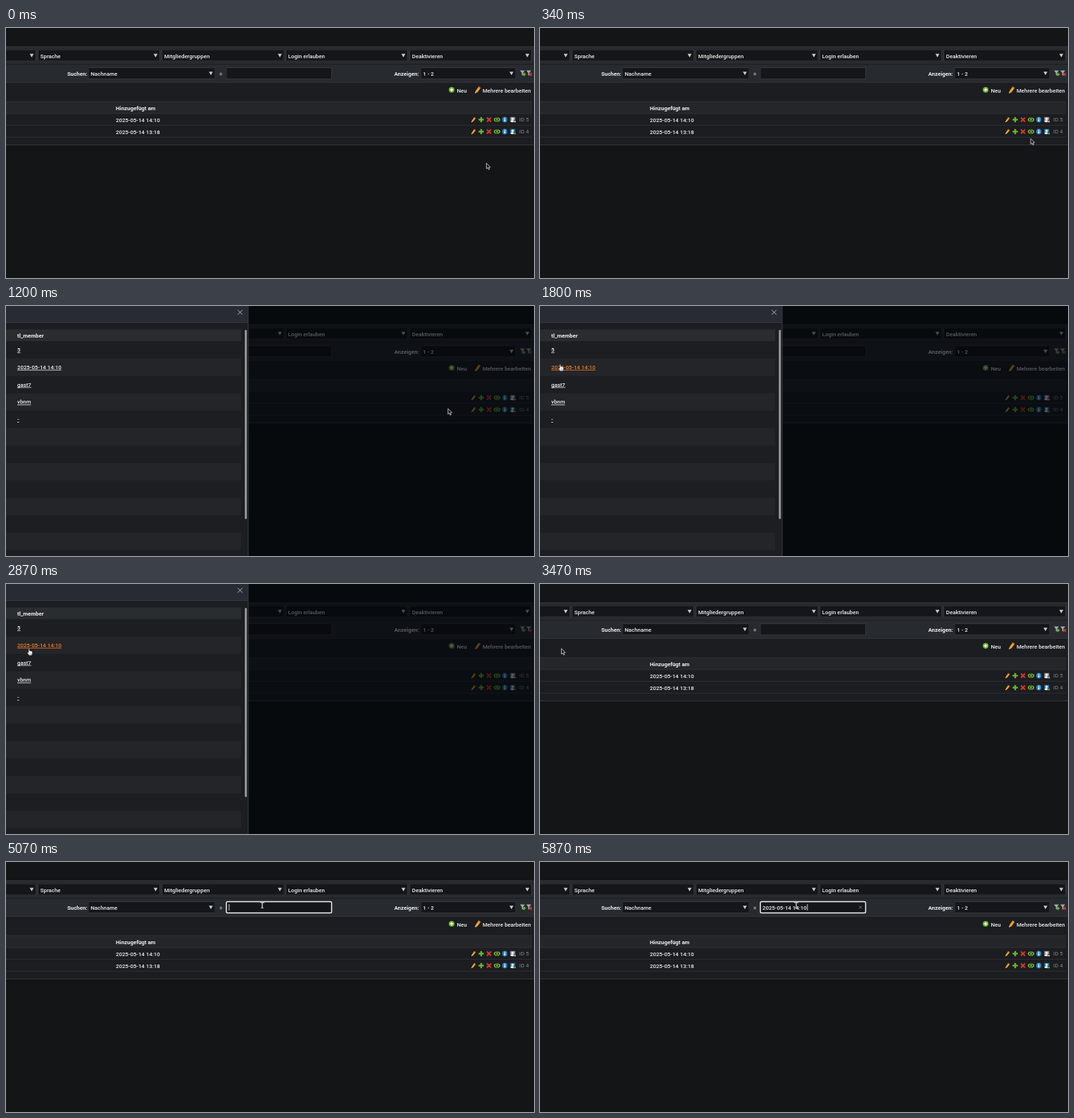
An HTML page with a canvas that plays this animation: 750 px wide and 356 px high, repeating every 5940 ms.

```html
<!DOCTYPE html>
<html lang="de">
<head>
<meta charset="utf-8">
<title>Mitglieder</title>
<style>
html, body { margin: 0; width: 100%; height: 100%; overflow: hidden; background: #141517; }
canvas { display: block; width: 750px; height: 356px; }
</style>
</head>
<body>
<canvas id="stage"></canvas>
<script>
const W = 750, H = 356, LOOP = 5940, STEP = 1000 / 15;
const canvas = document.getElementById('stage');
const ctx = canvas.getContext('2d');
const dpr = window.devicePixelRatio || 1;
canvas.width = W * dpr;
canvas.height = H * dpr;

const FONT = 'Roboto, "Open Sans", sans-serif';
const DATE = '2025-05-14 14:10';
const TEXT = '#f0f0f0', GREEN = '#6cb52d', RED = '#d8352b', AMBER = '#f0a32c', BLUE = '#2583bd';

const TICK = { open: 13, load: 17, close: 52, focus: 75, paste: 83 };

// Pointer path: tick, x, y
const PATH = [
  [0, 682, 192], [9, 707, 132], [16, 707, 132], [21, 481, 171],
  [26, 27, 76], [27, 26, 82.5], [30, 26, 83.5], [38, 38, 102],
  [39, 38, 102], [43, 30, 91.5], [58, 30, 91.5], [67, 290, 73], [71, 364, 61]
];

function rect(x, y, w, h, color) {
  ctx.fillStyle = color;
  ctx.fillRect(x, y, w, h);
}

function frame(x, y, w, h, color, line = 1) {
  ctx.strokeStyle = color;
  ctx.lineWidth = line;
  ctx.strokeRect(x + line / 2, y + line / 2, w - line, h - line);
}

function poly(points, color, stroke, line = 0.8) {
  ctx.beginPath();
  points.forEach(([x, y]) => ctx.lineTo(x, y));
  ctx.closePath();
  if (color) { ctx.fillStyle = color; ctx.fill(); }
  if (stroke) { ctx.strokeStyle = stroke; ctx.lineWidth = line; ctx.stroke(); }
}

function line(x1, y1, x2, y2, color, width) {
  ctx.beginPath();
  ctx.moveTo(x1, y1);
  ctx.lineTo(x2, y2);
  ctx.strokeStyle = color;
  ctx.lineWidth = width;
  ctx.stroke();
}

function oval(x, y, rx, ry, color) {
  ctx.beginPath();
  ctx.ellipse(x, y, rx, ry, 0, 0, Math.PI * 2);
  ctx.fillStyle = color;
  ctx.fill();
}

function text(str, x, y, color = TEXT, weight = 500) {
  ctx.font = `${weight} 7.85px ${FONT}`;
  ctx.fillStyle = color;
  ctx.fillText(str, x, y);
  return ctx.measureText(str).width;
}

function at(x, y, draw) {
  ctx.save();
  ctx.translate(x, y);
  draw();
  ctx.restore();
}

function plus(r, width, color) {
  line(-r, 0, r, 0, color, width);
  line(0, -r, 0, r, color, width);
}

function cross(r, color, width) {
  line(-r, -r, r, r, color, width);
  line(-r, r, r, -r, color, width);
}

function pencil(size) {
  ctx.scale(size, size);
  poly([[-3, 4], [-2.3, 1.2], [1.2, -3.8], [3.4, -2.2], [-0.2, 2.7]], AMBER);
  poly([[-3, 4], [-2.6, 2.4], [-1.6, 3.2]], '#f4dcae');
  poly([[1.2, -3.8], [3.4, -2.2], [2.7, -1.2], [0.5, -2.8]], '#d96f26');
}

function select(x, y, w, label) {
  rect(x, y, w, 17, '#151619');
  frame(x, y, w, 17, '#34363b');
  text(label, x + 3.8, y + 12);
  const cx = x + w - 6.5, cy = y + 6.3;
  poly([[cx - 2.8, cy], [cx + 2.8, cy], [cx, cy + 5]], '#c9c9c9');
}

function funnel(x, badge) {
  at(x, 64, () => {
    poly([[-4, -3.5], [3, -3.5], [0.5, -0.3], [0.5, 4], [-1.3, 2.7], [-1.3, -0.3]], '#a9abad');
    at(2, 2, badge);
  });
}

function rowIcons(y, badge) {
  at(664, y, () => pencil(0.95));
  at(675, y, () => plus(3.7, 2.4, GREEN));
  at(686, y, () => cross(2.9, RED, 2.1));
  at(697.5, y, () => {
    oval(0, 0, 4.6, 3.1, GREEN);
    oval(0, 0, 2.7, 2.1, '#1c1d21');
    oval(0, 0, 1.4, 1.4, GREEN);
  });
  at(708.5, y, () => {
    oval(0, 0, 3.6, 3.9, BLUE);
    rect(-0.8, -2.6, 1.6, 1.4, '#fff');
    rect(-0.8, -0.6, 1.6, 3.2, '#fff');
  });
  at(720, y, () => {
    rect(-3.7, -3.7, 7, 6.8, badge === GREEN ? '#2b78a9' : '#8f9193');
    oval(-0.4, -1.2, 1.7, 1.8, '#f3f3f3');
    oval(-0.4, 2.2, 2.9, 1.5, '#f3f3f3');
    oval(2.6, 2.5, 1.7, 1.7, '#1c1d21');
    oval(2.8, 2.7, 1.3, 1.3, badge);
  });
}

function searchField(n) {
  const active = n >= TICK.focus;
  rect(312.5, 56, 150.5, 17, '#151619');
  if (!active) {
    frame(312.5, 56, 150.5, 17, '#34363b');
    return;
  }
  ctx.beginPath();
  ctx.roundRect(313, 56.5, 149.5, 16, 1.5);
  ctx.strokeStyle = '#f2f2f2';
  ctx.lineWidth = 1.5;
  ctx.stroke();
  let caret = 316.5;
  if (n >= TICK.paste) {
    caret += text(DATE, 316, 67.5) + 0.3;
    at(455.3, 64.5, () => cross(2.1, '#8b8d90', 0.8));
  }
  rect(caret, 60, 0.8, 9, '#fff');
}

function page(n, pointer) {
  rect(0, 0, W, H, '#141517');
  rect(0, 26, W, 52, '#272a2f');
  rect(0, 26, W, 1, '#303238');
  rect(0, 51, W, 1, '#1b1d20');
  rect(0, 77, W, 1, '#303238');
  rect(0, 78, W, 88, '#1c1d21');

  select(-130, 30.5, 173, '');
  select(45, 30.5, 174, 'Sprache');
  select(221, 30.5, 174.5, 'Mitgliedergruppen');
  select(397, 30.5, 174, 'Login erlauben');
  select(573, 30.5, 174, 'Deaktivieren');

  text('Suchen:', 87, 67.5, TEXT, 700);
  select(116.5, 56, 181, 'Nachname');
  text('=', 303, 67.5);
  searchField(n);
  text('Anzeigen:', 551.5, 67.5, TEXT, 700);
  select(588.5, 56, 136, '1 - 2');
  funnel(734, () => plus(2.2, 1.7, GREEN));
  funnel(743, () => cross(1.8, RED, 1.7));

  at(633, 88, () => { oval(0, 0, 4, 4, GREEN); plus(2.2, 1.5, '#fff'); });
  text('Neu', 640.5, 91.5);
  at(670, 88, () => pencil(1.25));
  text('Mehrere bearbeiten', 677, 91.5);

  rect(0, 105, 747, 17, '#24262a');
  text('Hinzugefügt am', 156, 117, TEXT, 700);
  [[122, DATE, 'ID 5', '#bcbec0'], [139, '2025-05-14 13:18', 'ID 4', GREEN]].forEach(([y, date, id, badge]) => {
    const hover = n <= TICK.load && pointer.y >= y && pointer.y < y + 16;
    if (hover) rect(0, y, 747, 16.5, '#202126');
    text(date, 156, y + 11.5);
    rowIcons(y + 8.5, badge);
    text(id, 729, y + 11, '#85878a', 400);
  });
  [104.5, 121.5, 138, 155].forEach(y => rect(0, y, 747, 0.8, '#303238'));
  rect(0, 166, W, 1, '#34363b');
}

function overLink(p) {
  return p.x > 16 && p.x < 78 && p.y > 80 && p.y < 95;
}

function link(str, y, color = TEXT) {
  const w = text(str, 16, y, color);
  rect(16, y + 1, w, 0.8, color);
}

function modal(n, pointer) {
  const fade = Math.min(1, (n - TICK.open) / 5);
  rect(0, 0, W, H, `rgba(0, 4, 8, ${0.63 * fade})`);
  rect(0, 0, 344, H, '#1d1e22');
  rect(0, 0, 344, 23, '#282b33');
  rect(0, 23, 344, 1, '#363941');
  rect(343.5, 0, 1, H, '#3b3d43');
  at(332.5, 9, () => cross(3.3, '#b3b6bb', 1));
  if (n < TICK.load) return;

  rect(0, 33.5, 334, 16.5, '#2a2d30');
  text('tl_member', 16, 45, TEXT, 700);
  for (let i = 1; i < 12; i += 2) rect(0, 50 + i * 24.8, 334, 24.8, '#242529');
  const hover = overLink(pointer);
  ['5', DATE, 'gast7', 'vbnm', '-'].forEach((str, i) => {
    link(str, 65 + i * 24.8, hover && i === 1 ? '#f07d24' : TEXT);
  });
  ctx.beginPath();
  ctx.roundRect(339.3, 34, 2.8, 269.5, 1.4);
  ctx.fillStyle = '#9b9c9e';
  ctx.fill();
}

function pointerAt(n) {
  let i = PATH.findIndex(key => key[0] > n);
  if (i < 0) i = PATH.length;
  const a = PATH[i - 1], b = PATH[i] || a;
  const u = b === a ? 0 : (n - a[0]) / (b[0] - a[0]);
  const e = u * u * (3 - 2 * u);
  return { x: a[1] + (b[1] - a[1]) * e, y: a[2] + (b[2] - a[2]) * e };
}

function arrow() {
  poly([[0.4, 0.4], [0.4, 8.4], [2.2, 6.8], [3.5, 9.6], [4.9, 9], [3.6, 6.3], [6, 6.1]], '#17181a', '#dcdcdc');
}

function hand() {
  poly([[2, 0.3], [3.3, 0.5], [3.6, 3.6], [5, 3.7], [6.4, 4.2], [7.5, 4.9],
    [7.4, 8], [6.3, 10.2], [2.8, 10.2], [0.2, 6.5], [0.8, 5.5], [2, 6.3]], '#f6f6f6', '#222', 0.6);
  line(4.1, 7, 4.1, 9, '#555', 0.5);
  line(5.6, 7, 5.6, 9, '#555', 0.5);
}

function beam() {
  line(-3, -3.4, 3, -3.4, '#b5b5b5', 1.8);
  line(0, -4, 0, 4.5, '#b5b5b5', 1.6);
  line(-2, 4.3, 2, 4.3, '#b5b5b5', 1);
}

function render(ms) {
  const n = Math.floor((ms + 4) / STEP);
  const p = pointerAt(n);
  const open = n >= TICK.open && n < TICK.close;
  ctx.setTransform(dpr, 0, 0, dpr, 0, 0);
  page(n, p);
  if (open) modal(n, p);
  const inField = !open && p.x > 313 && p.x < 462 && p.y > 57 && p.y < 73;
  const shape = inField ? beam : open && overLink(p) ? hand : arrow;
  at(p.x, p.y, shape);
}

const start = performance.now();
function tick() {
  render((performance.now() - start) % LOOP);
  requestAnimationFrame(tick);
}
tick();
</script>
</body>
</html>
```
